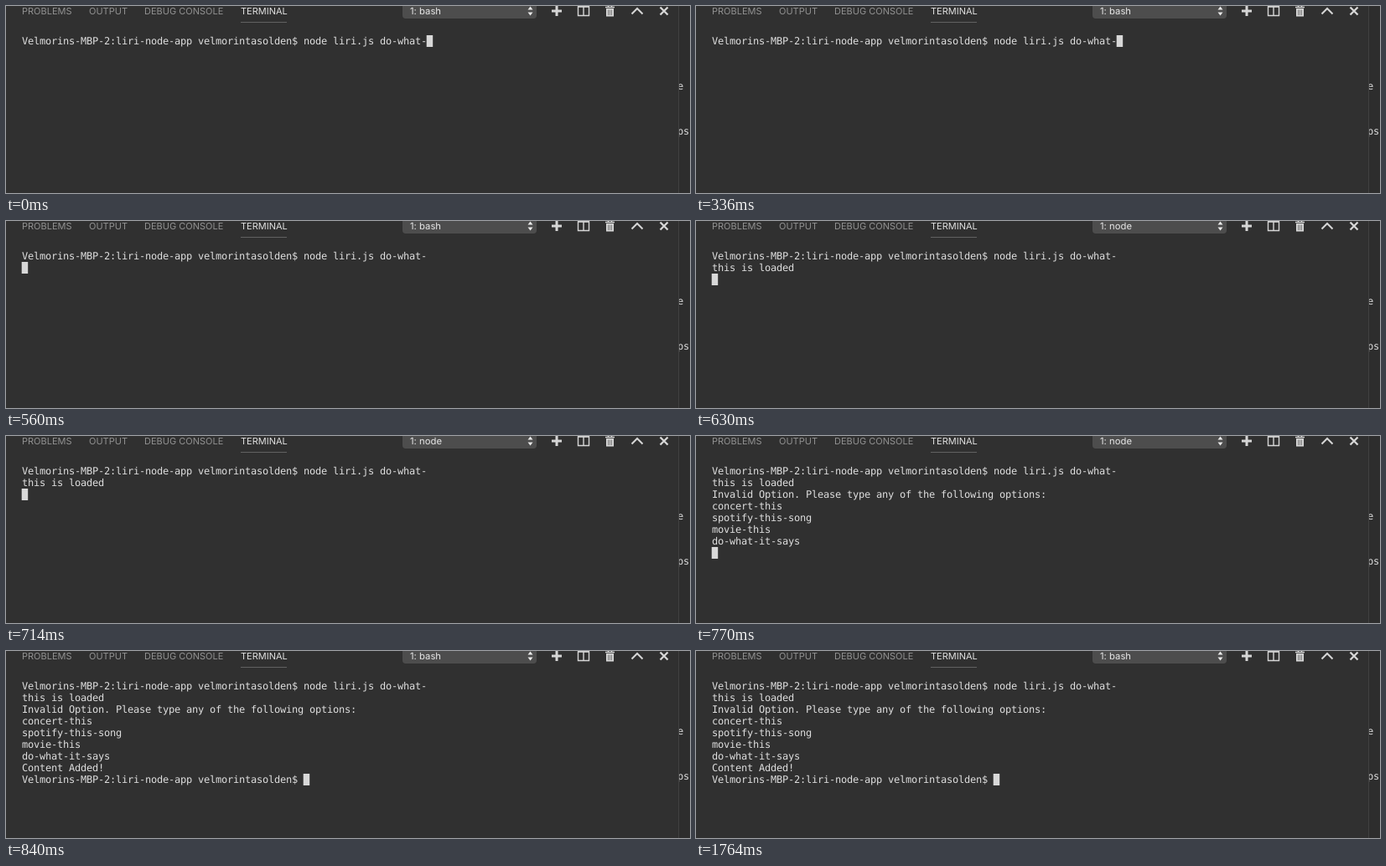
Animation, 816 px wide and 224 px high, one loop 2.38 s. Source, as an HTML page:

```html
<!DOCTYPE html>
<html lang="en">
<head>
<meta charset="utf-8">
<title>Terminal</title>
<style>
  html, body { margin: 0; width: 100%; height: 100%; overflow: hidden; background: #303030; }
  svg { display: block; width: 816px; height: 224px; }
  text { white-space: pre; text-rendering: geometricPrecision; }
  .ui { font: 11px Inter, sans-serif; fill: #929292; }
  .ui .active { fill: #e2e2e2; }
  #shell { font-size: 11.3px; fill: #e8e8e8; }
  .mono { font: 12px "DejaVu Sans Mono", monospace; letter-spacing: -.224px; fill: #dedede; }
  .icon { fill: none; stroke: #d6d6d6; }
</style>
</head>
<body>
<svg viewBox="0 0 816 224">
  <defs><clipPath id="side"><path d="M803 0h13v224h-13z"/></clipPath></defs>
  <rect width="816" height="224" fill="#303030"/>
  <path d="M803 0h13v224h-13z" fill="#2d2d2d"/>
  <path d="M802.5 0v224" stroke="#404040"/>

  <g class="ui">
    <text x="19" y="10">PROBLEMS</text>
    <text x="99" y="10">OUTPUT</text>
    <text x="165" y="10">DEBUG CONSOLE</text>
    <text x="280" y="10" class="active">TERMINAL</text>
  </g>
  <path d="M280 19.5h55" stroke="#626262"/>

  <rect x="473" y="-8" width="160" height="23" rx="4" fill="#4d4d4d"/>
  <text id="shell" class="ui" x="482" y="10"></text>
  <path d="M622.5 4.5l3-4 3 4zM622.5 7.5l3 4 3-4z" fill="#e8e8e8"/>

  <g class="icon">
    <path d="M651 6h12M657 0v12" stroke-width="3"/>
    <path d="M682.5 .5h13v11h-13zM689 0v12M682 1h14" stroke-width="1.4"/>
    <path d="M715 1.5h11M718.5 1v-2h4v2" stroke-width="1.5"/>
    <path d="M716 3h9v9.5h-9z" fill="#d6d6d6" stroke="none"/>
    <path d="M718.5 4.5v6.5M720.5 4.5v6.5M722.5 4.5v6.5" stroke="#505050" stroke-width=".7"/>
    <path d="M746.5 9.5l6.5-6.5 6.5 6.5" stroke-width="2"/>
    <path d="M780.5 1.5l9 9M789.5 1.5l-9 9" stroke-width="2.4"/>
  </g>

  <g class="mono" clip-path="url(#side)">
    <text x="801" y="100">e</text>
    <text x="801" y="154">ps</text>
  </g>
  <g id="lines" class="mono"></g>
  <rect id="cursor" width="7.5" height="14" fill="#d8d8d8"/>
</svg>
<script>
const CHAR = 7, LINE = 14, LEFT = 19, TOP = 35, LOOP = 2380;
const prompt = 'Velmorins-MBP-2:liri-node-app velmorintasolden$ ';
const output = [
  prompt + 'node liri.js do-what-',
  'this is loaded',
  'Invalid Option. Please type any of the following options:',
  'concert-this',
  'spotify-this-song',
  'movie-this',
  'do-what-it-says',
  'Content Added!',
  prompt
];

// Each step: start time, cursor row, cursor column, shell label
const steps = [
  [0, 0, output[0].length, 'bash'],
  [560, 1, 0, 'bash'],
  [630, 2, 0, 'node'],
  [770, 7, 0, 'node'],
  [840, 8, prompt.length, 'bash']
];

const $ = id => document.getElementById(id);
const rows = output.map((line, i) => {
  const row = document.createElementNS('http://www.w3.org/2000/svg', 'text');
  row.setAttribute('x', LEFT);
  row.setAttribute('y', TOP + 11 + i * LINE);
  row.textContent = line;
  return $('lines').appendChild(row);
});

let shown;
function draw() {
  const t = performance.now() % LOOP;
  const step = steps.findLast(s => s[0] <= t);
  if (step !== shown) {
    shown = step;
    const [, row, col, shell] = step;
    rows.forEach((el, i) => el.style.display = i < row || (i === row && col) ? '' : 'none');
    $('cursor').setAttribute('x', LEFT - .3 + col * CHAR);
    $('cursor').setAttribute('y', TOP + row * LINE);
    $('shell').textContent = '1: ' + shell;
  }
  requestAnimationFrame(draw);
}
draw();
</script>
</body>
</html>
```
